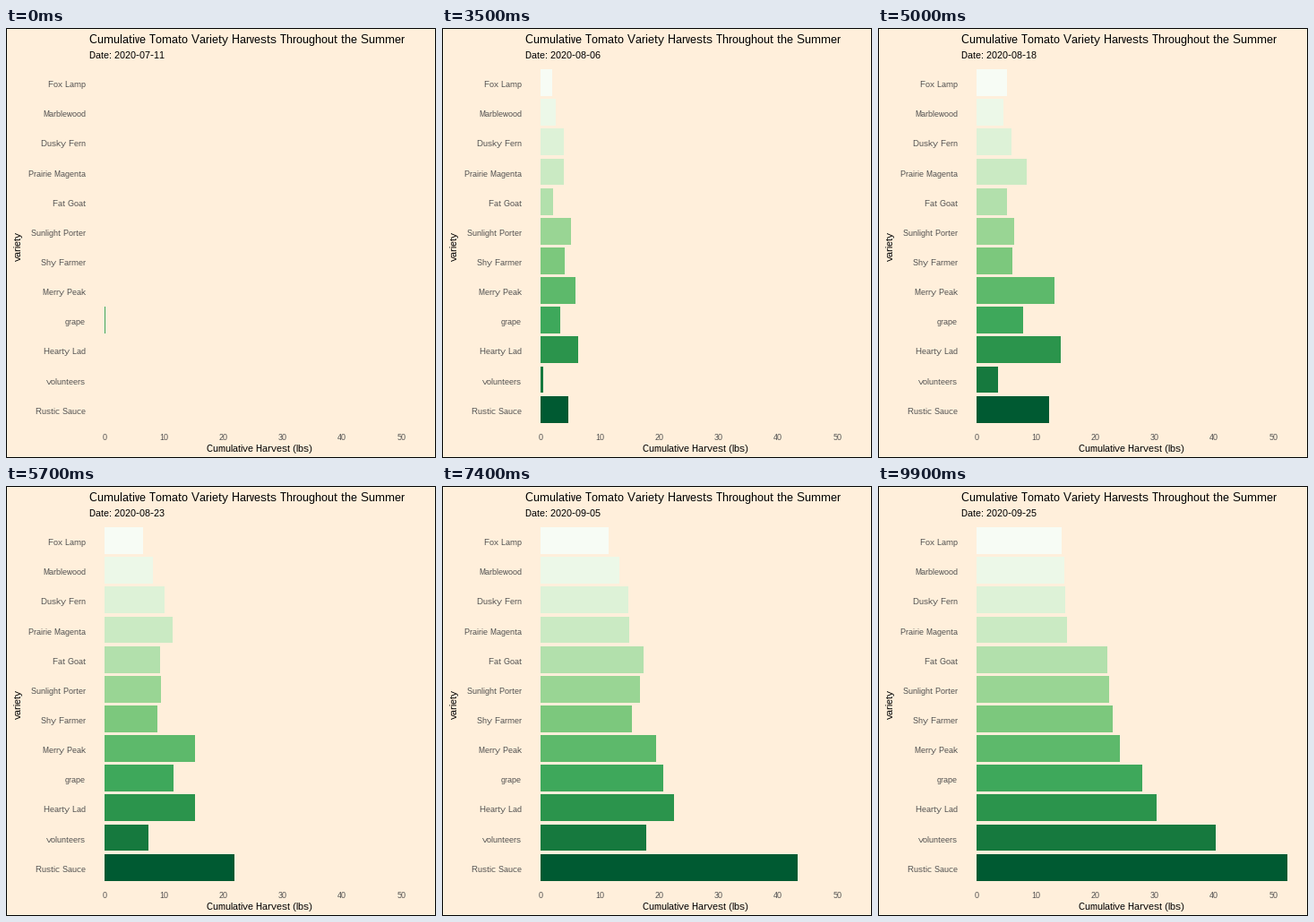
A matplotlib script for the animation above (10 s loop, 480 px wide and 480 px high).

```python
import numpy as np
import matplotlib as mpl
import matplotlib.pyplot as plt
from matplotlib.animation import FuncAnimation
from matplotlib.patches import Rectangle

SIZE, DPI = 480, 80
FRAMES, STEP_MS, DAYS = 100, 100, 76
X0, PX_PER_LB = 109.7, 6.63
ROW0, ROW_GAP = 61.09, 33.14
BAR_H = 0.9 * ROW_GAP
BACK, AXIS_GREY = "#FFEFDB", "#4D4D4D"

mpl.rcParams.update({
    "font.family": "Liberation Sans",
    "text.hinting": "native",
    "text.hinting_factor": 1,
    "text.kerning_factor": 6,
})

GREENS = ["#F7FCF5", "#E5F5E0", "#C7E9C0", "#A1D99B",
          "#74C476", "#41AB5D", "#238B45", "#005A32"]

# Cumulative pounds at these steps of the loop
KNOTS = (20, 35, 50, 64, 89, 99)
HARVEST = {
    "Fox Lamp": (0, 2.0, 5.2, 8.0, 14.4, 14.4),
    "Marblewood": (0, 2.6, 4.6, 11.7, 14.8, 14.8),
    "Dusky Fern": (0, 4.0, 5.9, 14.5, 15.0, 15.0),
    "Prairie Magenta": (0.95, 4.0, 8.5, 14.5, 15.3, 15.3),
    "Fat Goat": (0.8, 2.15, 5.2, 13.5, 20.55, 22.1),
    "Sunlight Porter": (0, 5.2, 6.4, 12.7, 20.1, 22.4),
    "Shy Farmer": (0, 4.1, 6.1, 11.7, 18.6, 23.0),
    "Merry Peak": (1.4, 5.9, 13.2, 17.5, 21.3, 24.2),
    "grape": (0.8, 3.35, 7.9, 15.4, 25.2, 27.95),
    "Hearty Lad": (0.95, 6.4, 14.2, 16.5, 27.5, 30.4),
    "volunteers": (0, 0.5, 3.65, 10.75, 29.15, 40.3),
    "Rustic Sauce": (1.25, 4.7, 12.25, 31.85, 46.2, 52.4),
}
# Extra bends for rows that do not grow evenly between the knots
BENDS = {
    "grape": {0: 0.05, 9: 0.05},
    "Hearty Lad": {42: 10.6},
    "volunteers": {30: 0, 31: 0.2, 42: 1.4, 53: 5.6, 75: 18.5},
    "Rustic Sauce": {53: 16.2, 75: 44.5, 86: 46.05, 97: 51.0},
}


def growth(name):
    """Pounds of one variety for every step of the loop."""
    points = {0: 0, 13: 0}
    if name == "grape":
        points = {}
    points.update(zip(KNOTS, HARVEST[name]))
    points[75] = points[64] + 0.6 * (points[89] - points[64])
    points.update(BENDS.get(name, {}))
    steps = sorted(points)
    return np.interp(np.arange(FRAMES), steps, [points[s] for s in steps])


def ramp(count):
    """Evenly spaced colours along the green palette."""
    stops = np.array([mpl.colors.to_rgb(c) for c in GREENS])
    at = np.linspace(0, len(stops) - 1, count)
    idx = np.arange(len(stops))
    return np.stack([np.interp(at, idx, ch) for ch in stops.T], axis=1)


def date_label(step):
    month, day = 7, 11 + DAYS * step // (FRAMES - 1)
    for length in (31, 31):
        if day > length:
            month, day = month + 1, day - length
    return f"Date: 2020-{month:02d}-{day:02d}"


def label(x, y, text, px, color="black", ha="left", **kw):
    return ax.text(x, y, text, fontsize=px * 72 / DPI, color=color,
                   ha=ha, va="baseline", **kw)


fig = plt.figure(figsize=(SIZE / DPI, SIZE / DPI), dpi=DPI, facecolor=BACK)
ax = fig.add_axes([0, 0, 1, 1])
ax.set(xlim=(0, SIZE), ylim=(SIZE, 0))
ax.axis("off")

ax.add_patch(Rectangle((0.5, 0.5), SIZE - 1, SIZE - 1, fill=False,
                       edgecolor="black", linewidth=72 / DPI, snap=False))
label(93, 17, "Cumulative Tomato Variety Harvests Throughout the Summer", 13)
date = label(93, 34, date_label(0), 11)
label(283, 473, "Cumulative Harvest (lbs)", 11, ha="center")
label(17, 243, "variety", 11, ha="center", rotation=90,
      rotation_mode="anchor")
for lbs in range(0, 60, 10):
    label(X0 + PX_PER_LB * lbs, 460, str(lbs), 9, AXIS_GREY, "center")

LEFT = round(X0)
bars, pounds = [], []
for row, (name, color) in enumerate(zip(HARVEST, ramp(len(HARVEST)))):
    mid = ROW0 + row * ROW_GAP
    top, bottom = round(mid - BAR_H / 2), round(mid + BAR_H / 2)
    label(89, round(mid + 5.1), name, 9, AXIS_GREY, "right")
    bar = Rectangle((LEFT, top), 0, bottom - top, facecolor=color,
                    linewidth=0, antialiased=False)
    bars.append(ax.add_patch(bar))
    pounds.append(growth(name))


def draw(step):
    date.set_text(date_label(step))
    for bar, lbs in zip(bars, pounds):
        width = round(X0 + PX_PER_LB * lbs[step]) - LEFT
        bar.set_width(max(width, 1))
        bar.set_visible(bool(lbs[step] > 0))
    return [date, *bars]


anim = FuncAnimation(fig, draw, frames=FRAMES, interval=STEP_MS,
                     init_func=lambda: draw(0), repeat=True, repeat_delay=0)
plt.show()
```
